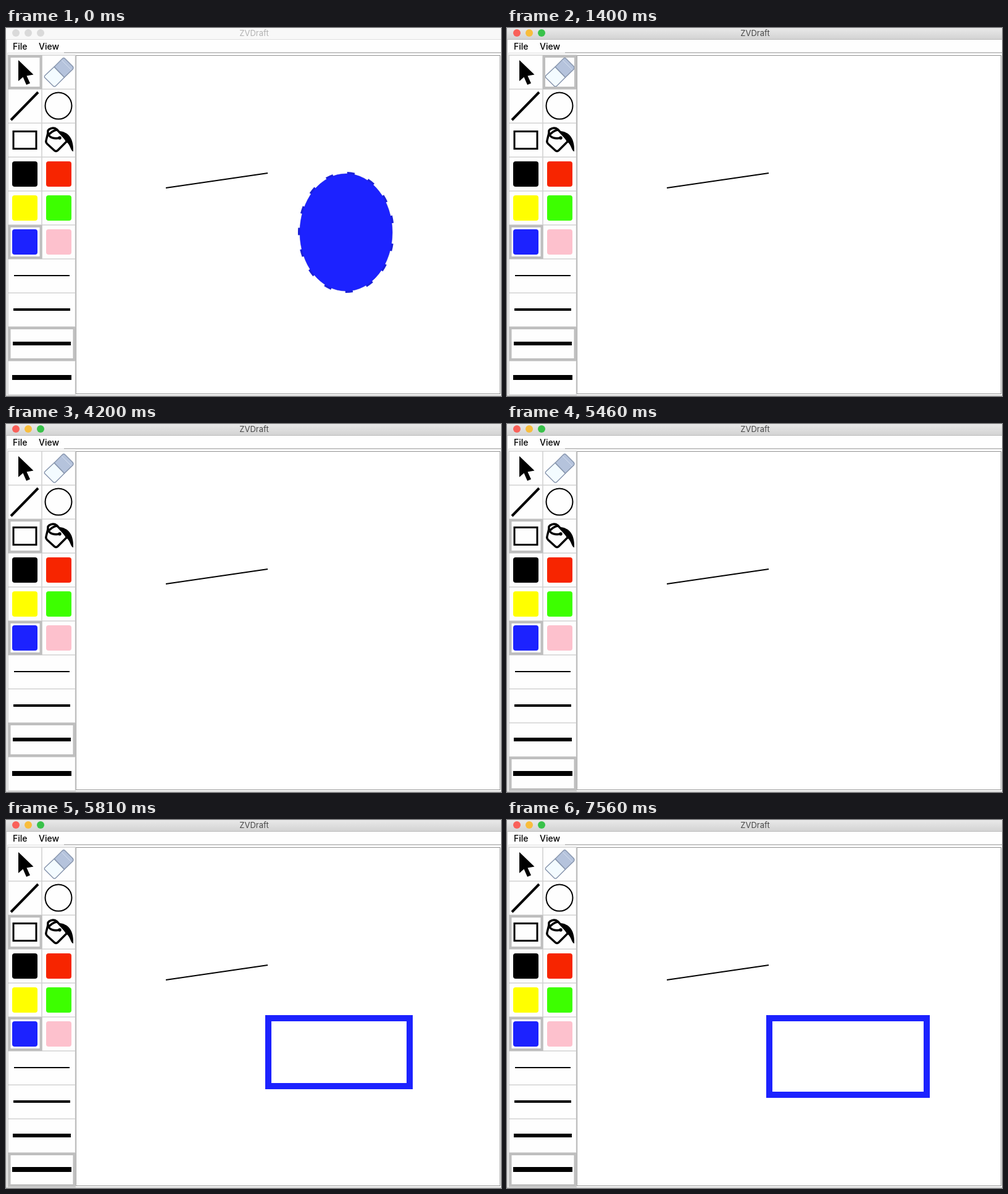
These frames come from a looping animation (802 px wide and 596 px high, 8 s). An HTML page:

```html
<!DOCTYPE html>
<html lang="en">
<head>
<meta charset="utf-8">
<title>Drawing window</title>
<style>
  html, body { margin: 0; width: 100%; height: 100%; overflow: hidden; background: #fff; }
  svg { display: block; width: 802px; height: 596px; }
  text { font-family: Inter, "Open Sans", sans-serif; }
  .menu { font-size: 14px; font-weight: 500; }
  .mark { fill: none; stroke: #bebebe; stroke-width: 4; }
  .grid { fill: none; stroke: #d2d2d2; stroke-width: 1.6; }
  .ink { fill: none; stroke: #000; }
</style>
</head>
<body>
<svg viewBox="0 0 802 596">
  <defs>
    <linearGradient id="chrome" x2="0" y2="1">
      <stop stop-color="#e9e9e9"/><stop offset="1" stop-color="#d3d3d3"/>
    </linearGradient>
  </defs>
  <rect width="802" height="596" fill="#fefefe"/>

  <!-- Window frame -->
  <rect id="bar" width="802" height="18"/>
  <path id="barEdge" d="M0 18.5H802"/>
  <g id="lights"></g>
  <text id="title" x="402" y="13" font-size="13" text-anchor="middle">ZVDraft</text>
  <text class="menu" x="11" y="35">File</text>
  <text class="menu" x="53" y="35">View</text>
  <path d="M94 40H802" stroke="#8c8c8c"/>
  <path d="M2 40.5H94M2.5 41V595" stroke="#dedede"/>
  <path d="M.5 19V596M0 595.5H802" stroke="#c4c4c4"/>
  <rect x="113.5" y="44.5" width="687" height="548" fill="#fff" stroke="#929292"/>

  <!-- Tool panel -->
  <path class="grid" d="M3 44H113M3 99H113M3 154H113M3 209H113M3 264H113M3 319H113M3 374H113M3 429H113M3 484H113M3 539H113M3 594H113M3 44V594M58 44V374M112.5 44V594"/>
  <path d="M20 52V86L27.5 79.5L33 92L39 89.5L33.5 77.5L44.5 75.5Z"/>
  <g stroke="#8593ab" stroke-width="1.4" stroke-linejoin="round">
    <path d="M78 63L91 50Q93.500 47 96 50L108 62Q110 64.500 108 67L94.500 80Z" fill="#b5c3dc"/>
    <path d="M78 63L94.500 80L81 93.500Q78.500 96 76 93.500L63.500 81Q61 79 63.500 76.500Z" fill="#f3fbff"/>
    <path d="M90 52L106 68" stroke="#d4deee" stroke-width="1"/>
  </g>
  <path class="ink" d="M8 149L52 104" stroke-width="4"/>
  <circle class="ink" cx="85" cy="126" r="21.500" stroke-width="2"/>
  <rect class="ink" x="12" y="167.500" width="37" height="28" stroke-width="3"/>
  <g class="ink" stroke-width="3.400" stroke-linecap="round" stroke-linejoin="round">
    <path d="M68 170L65 182Q64 185 67 188L78 198Q81 201 84 198L98 184"/>
    <path d="M68 170C66 163 77 160 82 164L99 182"/>
    <path d="M68 171C70 178 79 180 87 178M70 172Q77 165 83 165"/>
    <circle cx="87" cy="178" r="1"/>
  </g>
  <path d="M86 167C101 168 110 179 109 200C104 199 105 189 97 184Z"/>
  <g id="swatches"></g>
  <g id="weights"></g>
  <rect class="mark" id="toolMark" width="51" height="51"/>
  <rect class="mark" x="5.500" y="321" width="51" height="51"/>
  <rect class="mark" id="weightMark" x="5.500" width="105" height="51"/>

  <!-- Drawing -->
  <path class="ink" d="M259 259L424 235" stroke-width="2"/>
  <g id="oval">
    <ellipse cx="551" cy="331" rx="75" ry="95" fill="none" stroke="#1c22d8" stroke-width="6" stroke-dasharray="12 23" stroke-dashoffset="-18"/>
    <ellipse cx="551" cy="331" rx="75" ry="95" fill="#1c22ff" stroke="#1a1fd8" stroke-width=".6"/>
  </g>
  <rect id="box" x="425" y="321" fill="none" stroke="#1c22ff" stroke-width="10"/>
</svg>
<script>
const LOOP = 8000;
const $ = id => document.getElementById(id);

function add(parent, tag, attrs) {
  const el = document.createElementNS('http://www.w3.org/2000/svg', tag);
  set(el, attrs);
  $(parent).append(el);
  return el;
}

function set(el, attrs) {
  for (const key in attrs) el.setAttribute(key, attrs[key]);
}

const lightColors = ['#f9615a', '#f8bd3c', '#39c24a'];
const lights = lightColors.map((_, i) =>
  add('lights', 'circle', { cx: 16 + 20 * i, cy: 8, r: 6 }));

['#000', '#f72500', '#ff0', '#3dff00', '#1c22ff', '#fdc1cd'].forEach((fill, i) =>
  add('swatches', 'rect', {
    x: 10 + 55 * (i % 2), y: 216 + 55 * Math.floor(i / 2),
    width: 41, height: 41, rx: 4, fill
  }));

for (let i = 0; i < 4; i++) {
  add('weights', 'rect', { x: 13 - i, y: 400 + 54 * i, width: 90 + 2 * i, height: 2 + 2 * i });
}

// Each track holds [start time, value] steps.
const focus = [[0, false], [490, true]];
const tool = [[0, [5.5, 46]], [490, [60, 46]], [2730, [5.5, 156]]];
const weight = [[0, 486], [4690, 541]];
const oval = [[0, true], [1120, false]];
const box = [
  [0, null], [5600, [22, 10]], [5670, [98, 45]], [5740, [176, 82]],
  [5810, [229, 110]], [5880, [249, 121]], [5950, [255, 124]]
];

const at = (track, t) => track.findLast(step => step[0] <= t)[1];
const show = (id, on) => set($(id), { visibility: on ? 'visible' : 'hidden' });

function draw(t) {
  const active = at(focus, t);
  set($('bar'), { fill: active ? 'url(#chrome)' : '#f8f8f8' });
  set($('barEdge'), { stroke: active ? '#bcbcbc' : '#dedede' });
  set($('title'), { fill: active ? '#484848' : '#b2b2b2' });
  lights.forEach((el, i) => set(el, { fill: active ? lightColors[i] : '#dadada' }));

  const [x, y] = at(tool, t);
  set($('toolMark'), { x, y });
  set($('weightMark'), { y: at(weight, t) });

  show('oval', at(oval, t));
  const size = at(box, t);
  show('box', size);
  if (size) set($('box'), { width: size[0], height: size[1] });
}

const start = performance.now();
function tick() {
  draw((performance.now() - start) % LOOP);
  requestAnimationFrame(tick);
}
tick();
</script>
</body>
</html>
```
